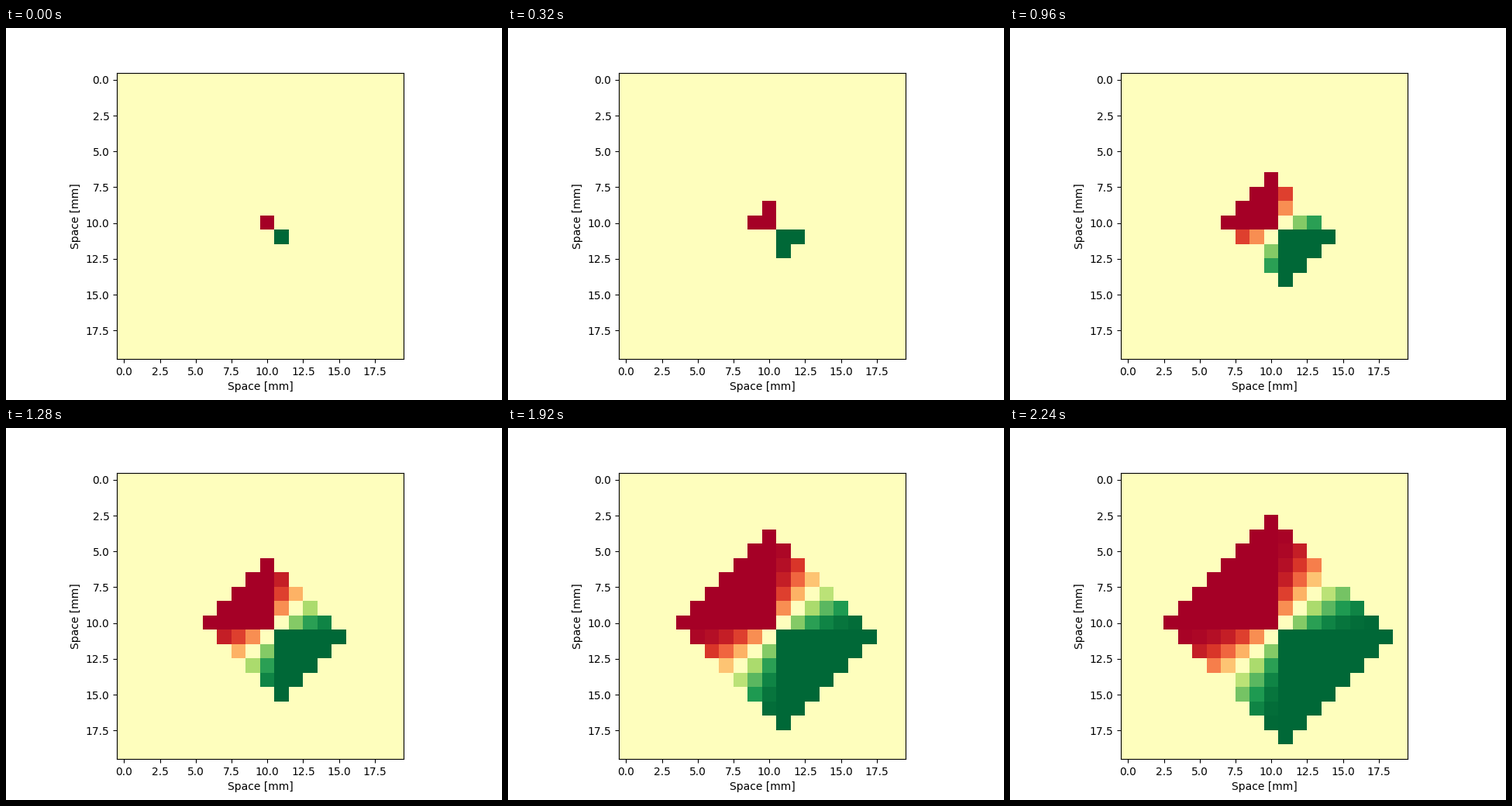
Write a matplotlib script that moves like this. It is 640x480 px and loops after 2560 ms.

```python
import numpy as np
import matplotlib.pyplot as plt
from matplotlib.animation import FuncAnimation

SIZE = 20
STEPS = 8


def neighbours(a):
    """Sum of the four direct neighbours of every cell."""
    p = np.pad(a, 1)
    return p[:-2, 1:-1] + p[2:, 1:-1] + p[1:-1, :-2] + p[1:-1, 2:]


def spread(values, known):
    """Fill empty cells on the rim with the mean of their known neighbours."""
    count = neighbours(known.astype(float))
    rim = ~known & (count > 0)
    mean = neighbours(values) / np.maximum(count, 1)
    return np.where(rim, mean, values), known | rim


def simulate():
    values = np.zeros((SIZE, SIZE))
    values[10, 10], values[11, 11] = -1, 1
    known = values != 0
    fields = [values]
    for _ in range(STEPS - 1):
        values, known = spread(values, known)
        fields.append(values)
    return fields


fields = simulate()

fig, ax = plt.subplots(figsize=(6.4, 4.8), dpi=100)
image = ax.imshow(fields[0], cmap="RdYlGn", vmin=-1, vmax=1)
ax.set_xlabel("Space [mm]")
ax.set_ylabel("Space [mm]")


def update(i):
    image.set_data(fields[i])
    return [image]


anim = FuncAnimation(fig, update, frames=STEPS, interval=320,
                     repeat=True, repeat_delay=0)
plt.show()
```
